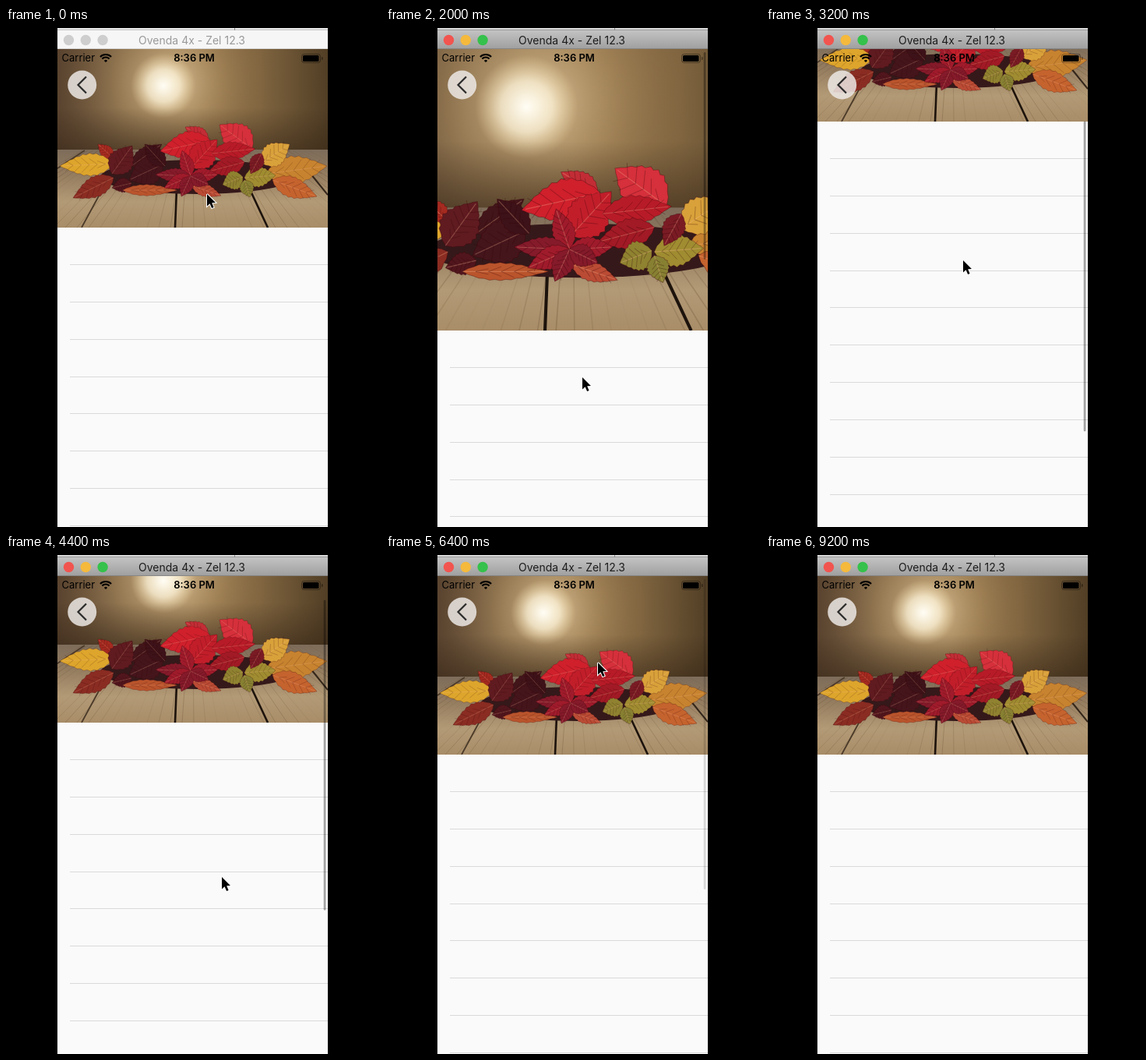
An HTML page with a canvas for the animation above (9.6 s loop, 480x640 px).

```html
<!DOCTYPE html>
<html lang="en">
<head>
<meta charset="utf-8">
<title>Stretchy header</title>
<style>
  html, body { margin: 0; width: 100%; height: 100%; overflow: hidden; background: #000; }
  canvas { display: block; }
</style>
</head>
<body>
<canvas id="stage" width="480" height="640"></canvas>
<script>
const ctx = document.getElementById('stage').getContext('2d');
const LEFT = 66, TOP = 27, WIDTH = 347, PHOTO_H = 229, REST = 256, ROW = 47.85;
const STEP = 400, LOOP = 9600;

// One pose per step: header bottom, scroll bar opacity, pointer x and y
const POSES = [
  [256, 0, 258, 213], [256, 0, 258, 205], [256, 0, 257, 180], [256, 0, 256, 150],
  [436, .35, 250, 562], [388, .35, 252, 448], [437, .35, 252, 576], [240, .35, 253, 410],
  [120, .35, 253, 298], [181, .35, 262, 355], [100, .35, 270, 290], [215, .35, 277, 413],
  [145, .35, 276, 340], [330, .35, 275, 400], [432, .35, 274, 500], [264, .35, 274, 300],
  [256, .14, 272, 138], [356, .35, 272, 420], [262, .2, 300, 500],
];
const IDLE = [REST, 0];

// Leaves in photo space: stem x and y, tip x and y, half width
const BACK_LEAVES = [
  ['#a52a20', 72, 140, 52, 122, 8], ['#8a2c22', 72, 165, 20, 191, 13],
  ['#dda52c', 72, 147, 3, 150, 14], ['#42151a', 95, 150, 134, 122, 11],
  ['#c7832f', 268, 160, 346, 150, 18], ['#d9a13a', 262, 146, 298, 122, 15],
  ['#c5632e', 276, 168, 333, 189, 13], ['#5f1b20', 70, 160, 96, 124, 16],
];
const FRONT_LEAVES = [
  ['#51161d', 95, 172, 70, 178, 9], ['#45151c', 135, 148, 92, 168, 17],
  ['#3d1218', 138, 150, 112, 122, 11], ['#b9542c', 84, 181, 154, 181, 7],
  ['#c22d35', 194, 118, 164, 100, 10], ['#cf202c', 196, 117, 132, 131, 17],
  ['#d5303b', 250, 128, 208, 97, 19], ['#c11e2a', 172, 152, 205, 116, 17],
  ['#b71b27', 198, 134, 254, 128, 12], ['#a11a25', 240, 145, 194, 157, 12],
  ['#8f8230', 238, 164, 212, 174, 12], ['#a08c31', 240, 165, 280, 162, 13],
  ['#878032', 240, 168, 247, 190, 9], ['#7a1b24', 262, 134, 248, 160, 9],
  ['#ba4b34', 172, 175, 210, 188, 8],
];
const PALM_TIPS = [[160, 130], [126, 161], [137, 178], [159, 189], [206, 161], [194, 174]];

function shape(points, fill) {
  ctx.beginPath();
  for (const [x, y] of points) ctx.lineTo(x, y);
  ctx.closePath();
  ctx.fillStyle = fill;
  ctx.fill();
}

function line(color, width, ...points) {
  ctx.beginPath();
  for (const [x, y] of points) ctx.lineTo(x, y);
  ctx.strokeStyle = color;
  ctx.lineWidth = width;
  ctx.stroke();
}

function rect(color, x, y, w, h) {
  ctx.fillStyle = color;
  ctx.fillRect(x, y, w, h);
}

function pill(color, x, y, w, h, r) {
  ctx.beginPath();
  ctx.roundRect(x, y, w, h, r);
  ctx.fillStyle = color;
  ctx.fill();
}

function disc(color, x, y, r) {
  pill(color, x - r, y - r, 2 * r, 2 * r, r);
}

function label(text, x, y, font, color, align) {
  ctx.font = font + ' Inter, sans-serif';
  ctx.textAlign = align;
  ctx.fillStyle = color;
  ctx.fillText(text, x, y);
}

function blend(gradient, colors) {
  colors.forEach((color, i) => gradient.addColorStop(i / (colors.length - 1), color));
  return gradient;
}

function leaf([color, x, y, tipX, tipY, half]) {
  const length = Math.hypot(tipX - x, tipY - y), n = 16;
  const edge = [];
  for (let i = 0; i <= 2 * n; i++) {
    const s = i <= n ? i / n : 2 - i / n;
    const bulge = half * Math.sin(Math.PI * s ** .8) * (i % 2 ? 1.06 : .94);
    edge.push([s * length, i <= n ? -bulge : bulge]);
  }
  ctx.save();
  ctx.translate(x, y);
  ctx.rotate(Math.atan2(tipY - y, tipX - x));
  shape(edge, color);
  line('rgba(60,5,10,.35)', .6, ...edge);
  line('rgba(255,190,150,.3)', .7, [0, 0], [length * .95, 0]);
  for (let s = .15; s < .8; s += .15) {
    const w = half * .7 * Math.sin(Math.PI * s);
    line('rgba(50,0,5,.3)', .6, [(s + .15) * length, -w], [s * length, 0], [(s + .15) * length, w]);
  }
  ctx.restore();
}

function glow(x, y, r, colors) {
  ctx.fillStyle = blend(ctx.createRadialGradient(x, y, 0, x, y, r), colors);
  ctx.fillRect(0, 0, WIDTH, 131);
}

function photo() {
  rect(blend(ctx.createLinearGradient(0, 0, WIDTH, 0),
    ['#59432f', '#80684a', '#947750', '#806540', '#513e25']), 0, 0, WIDTH, 131);
  glow(145, 44, 150, ['rgba(232,208,165,.85)', 'rgba(180,145,95,.35)', 'rgba(100,75,45,0)']);
  glow(136, 47, 42, ['#fffdf5', 'rgba(255,246,220,.7)', 'rgba(245,220,170,0)']);
  rect(blend(ctx.createLinearGradient(0, 75, 0, 131),
    ['rgba(55,38,22,0)', 'rgba(55,38,22,.6)']), 0, 75, WIDTH, 56);

  rect(blend(ctx.createLinearGradient(0, 129, 0, PHOTO_H),
    ['#7d6c5a', '#957d60', '#b39a76', '#a88d68']), 0, 129, WIDTH, 100);
  for (let i = 0; i < 44; i++) {
    const x = -140 + i * 15, far = 173 + (x - 173) * .45;
    line(`rgba(80,55,30,${.12 + .1 * Math.sin(i * 7)})`, 1, [far, 130], [x, PHOTO_H]);
  }
  line('#4b3a29', 1.6, [35, 130], [0, 153]);
  line('#4b3a29', 1.8, [62, 172], [31, PHOTO_H]);
  line('#1d130c', 2.6, [153, 180], [151, PHOTO_H]);
  line('#1d130c', 2.6, [246, 178], [270, PHOTO_H]);
  line('#33261a', 2, [325, 160], [WIDTH, 187]);

  ctx.beginPath();
  ctx.ellipse(180, 164, 125, 22, 0, 0, 7);
  ctx.fillStyle = '#35191a';
  ctx.fill();
  BACK_LEAVES.forEach(leaf);
  FRONT_LEAVES.forEach(leaf);
  PALM_TIPS.forEach(([x, y], i) => leaf([i % 2 ? '#841a2a' : '#9f1b2b', 171, 163, x, y, 9]));
}

function header(bottom) {
  const scale = Math.max(1, (bottom - TOP) / PHOTO_H);
  ctx.save();
  ctx.beginPath();
  ctx.rect(LEFT, TOP, WIDTH, bottom - TOP);
  ctx.clip();
  ctx.translate(LEFT + WIDTH / 2, bottom - PHOTO_H * scale);
  ctx.scale(scale, scale);
  ctx.translate(-WIDTH / 2, 0);
  photo();
  ctx.restore();
}

function titleBar(active) {
  const fill = active
    ? blend(ctx.createLinearGradient(0, 3, 0, TOP), ['#c3c3c3', '#9f9f9f'])
    : '#f6f6f6';
  rect(active ? '#d6d6d6' : '#e4e4e4', LEFT, 0, WIDTH, 3);
  rect(fill, LEFT, 3, WIDTH, TOP - 3);
  rect(active ? '#999' : '#c8c8c8', LEFT, 2, WIDTH, 1);
  rect('#888', 293, 0, 1, 3);
  rect(active ? '#868686' : '#d5d5d5', LEFT, TOP - 1, WIDTH, 1);
  ['#f2544f', '#f5b93c', '#35c14b'].forEach((color, i) =>
    disc(active ? color : '#cecece', 80.5 + i * 21.8, 15.5, 6.7));
  label('Ovenda 4x - Zel 12.3', 238.5, 21, '14px', active ? '#1c1c1c' : '#999', 'center');
}

function statusBar() {
  label('Carrier', 71.5, 43, '13px', '#000', 'left');
  label('8:36 PM', 241.5, 43, '600 13px', '#000', 'center');
  [3, 6.5, 10].forEach((r, i) => {
    ctx.beginPath();
    ctx.arc(128, 44, r, -Math.PI * .75, -Math.PI * .25);
    if (!i) ctx.lineTo(128, 44);
    ctx.strokeStyle = ctx.fillStyle = '#000';
    ctx.lineWidth = 2.1;
    i ? ctx.stroke() : ctx.fill();
  });
  ctx.beginPath();
  ctx.roundRect(379.5, 33.5, 24, 11, 3);
  ctx.strokeStyle = 'rgba(0,0,0,.4)';
  ctx.lineWidth = 1;
  ctx.stroke();
  pill('#000', 381, 35, 20.5, 8, 1.5);
  pill('rgba(0,0,0,.4)', 405, 37, 1.6, 4, 1);
}

function pointer(x, y) {
  ctx.save();
  ctx.translate(x, y);
  const arrow = [[0, 0], [0, 15.5], [3.6, 12.3], [6.1, 18], [8.6, 16.9], [6.2, 11.3], [11, 11]];
  line('#fff', 2, ...arrow, arrow[0]);
  shape(arrow, '#000');
  ctx.restore();
}

function draw(now) {
  const step = Math.floor(now % LOOP / STEP);
  const [bottom, barAlpha, x, y] = POSES[step] || IDLE;
  const offset = REST - bottom;

  rect('#000', 0, 0, 480, 640);
  rect('#fafafa', LEFT, TOP, WIDTH, 640 - TOP);
  for (let row = bottom - .3 + ROW; row < 640; row += ROW) {
    rect('#dadada', 82, Math.floor(row), 331, 1);
  }
  header(bottom);
  disc('rgba(238,234,231,.84)', 97.7, 73, 18.5);
  line('#2b2b2b', 2.2, [103, 62.5], [92.5, 73], [103, 83.5]);
  statusBar();
  if (barAlpha) {
    pill(`rgba(0,0,0,${barAlpha})`, 407.7, 31 + Math.max(0, offset * .65),
      2.8, 398 + Math.min(0, offset), 1.4);
  }
  titleBar(step > 0);
  if (x) pointer(x, y);
}

const start = performance.now();
function tick() {
  draw(performance.now() - start);
  requestAnimationFrame(tick);
}
tick();
</script>
</body>
</html>
```
